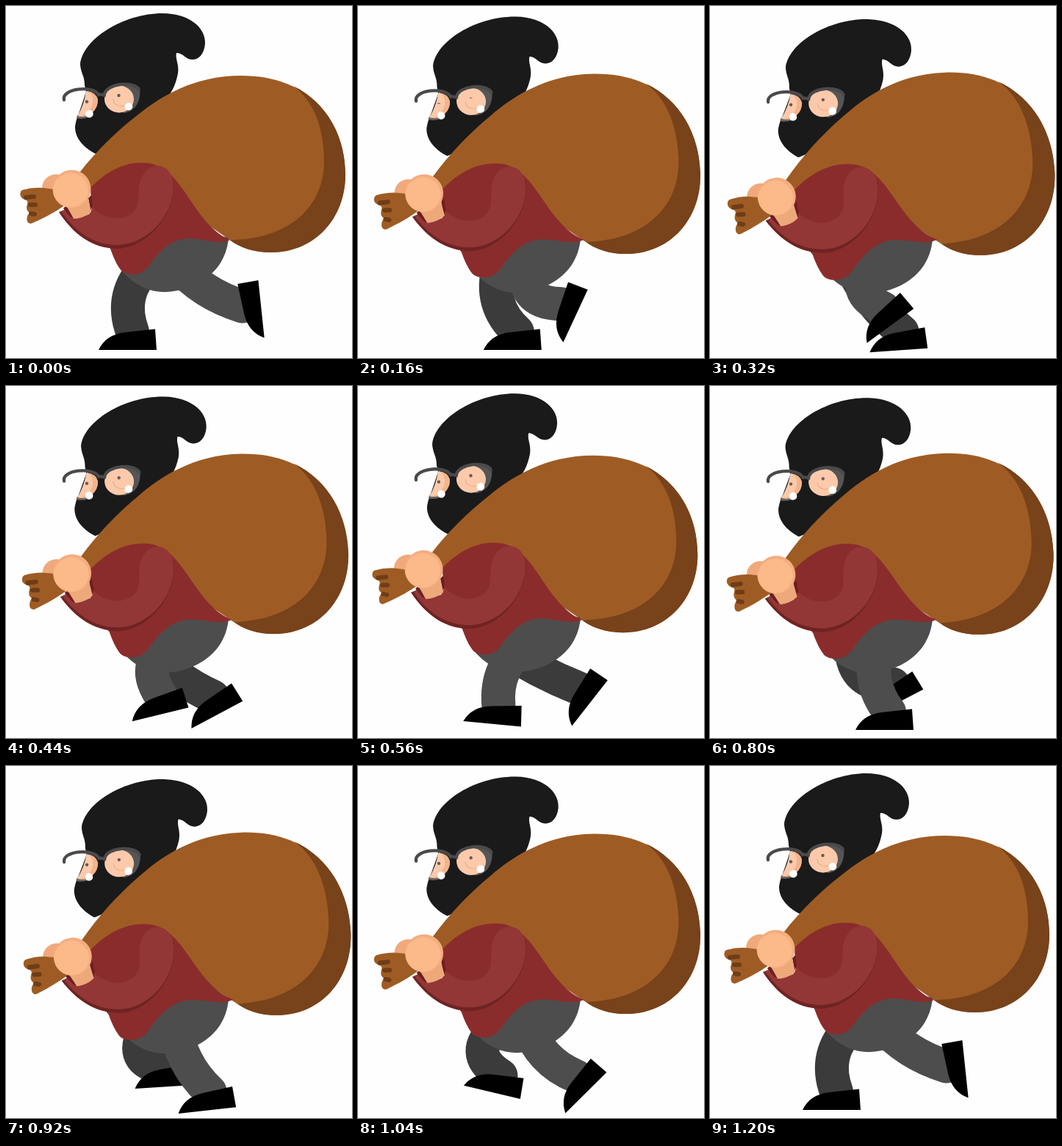
An HTML page that plays this animation: 471x480 px, repeating every 1220 ms.

```html
<!DOCTYPE html>
<html lang="en">
<head>
<meta charset="utf-8">
<title>Sneaking away</title>
<style>
html, body { margin: 0; height: 100%; overflow: hidden; background: #fefefe; }
svg { display: block; width: 100vw; height: 100vh; }
.pants { fill: none; stroke-width: 46; stroke-linecap: round; }
</style>
</head>
<body>
<svg viewBox="0 0 471 480">
  <g id="head">
    <path fill="#1a1a1a" d="M101 80C104 45 160 10 213 10C250 10 272 30 271 51C270 66 262 73 254 73C244 73 240 63 232 64C230 72 236 80 234 92C231 108 225 120 215 130L160 185L123 202C105 193 94 180 94 165C95 158 96 154 98 150L109 117L107 108C107 95 102 92 101 80Z"/>
    <path fill="#666" d="M97 149L96 153Q106 155 113 151L108 147Z"/>
    <path fill="#f2b48c" d="M109 117Q107 132 98 150Q108 153 117 146Q126 138 125 127Q122 117 110 116Z"/>
    <path fill="#fccaab" d="M109 117Q107 132 98 150Q106 151 112 144Q119 137 118 126Q116 117 110 116Z"/>
    <path fill="#555" d="M140 113C150 104 175 102 182 112C184 130 176 144 160 146Z"/>
    <ellipse cx="154" cy="127" rx="20" ry="18.5" fill="#fccaab"/>
    <path fill="none" stroke="#f2b48c" stroke-width="1.6" d="M146 127C146 134 153 138 161 136"/>
    <g fill="none" stroke="#4a4a4c" stroke-width="4.3" stroke-linecap="round">
      <path d="M79 128C75 113 118 107 126 121Q130 120 134 122"/>
      <path d="M134 120C138 105 174 102 181 114"/>
    </g>
    <g fill="#6b5a52">
      <ellipse class="pupil" cx="110" cy="130.5" rx="2.2" ry="2.2"/>
      <ellipse class="pupil" cx="153.5" cy="122" rx="2.2" ry="2.2"/>
    </g>
    <circle cx="113.5" cy="147" r="5.3" fill="#fff"/>
    <circle cx="167" cy="137" r="5.3" fill="#fff"/>
  </g>
  <g class="arm">
    <ellipse cx="68" cy="248" rx="19" ry="18.5" fill="#f0a97b"/>
  </g>
  <g id="bag">
    <path fill="#9e5c24" d="M22 251Q36 247 50 248L66 250L88 243L101 226C122 199 150 171 180 148C210 124 255 95 320 95C415 95 462 158 462 230C462 290 420 336 361 336C335 336 318 329 303 318L220 260L117 247L80 272C65 282 52 289 38 295Q32 299 29 294Q27 287 32 282Q26 278 29 270Q31 265 25 264Q17 260 20 253Z"/>
    <path fill="#78421a" d="M391 109C421 131 433 170 433 212C433 270 390 318 305 319C318 330 340 336 361 336C420 336 462 290 462 230C462 180 438 132 391 109Z"/>
    <path fill="none" stroke="#6f3d17" stroke-width="6" stroke-linecap="round" d="M27 261L38 260M33 271L40 271M34 283L39 284"/>
  </g>
  <path id="backLeg" class="pants" stroke="#3b3b3b"/>
  <path id="backShoe"/>
  <path id="hips" fill="#4d4d4d" d="M150 350C165 375 190 390 215 390C245 390 298 372 303 316L230 300Z"/>
  <path id="frontLeg" class="pants" stroke="#4d4d4d"/>
  <path id="frontShoe"/>
  <path id="torso" fill="#8b2c2c" d="M115 248C140 222 165 212 190 214C212 215 228 231 243 253C260 278 278 308 305 319C290 326 272 318 250 317C228 317 214 330 203 343C194 353 190 366 172 366Q163 366 157 361C150 352 146 342 142 331L118 300Z"/>
  <g class="arm">
    <path fill="#6f2323" d="M228 238C233 283 192 331 150 331C118 330 92 312 72 281L84 276L94 290L170 300L205 250Z"/>
    <path fill="#933636" d="M207 218C222 219 228 233 228 246C227 290 189 326 150 326C116 325 92 305 75 280L84 276L94 290L113 284L118 275C135 292 156 293 170 284C183 274 179 262 181 248C183 229 194 218 207 218Z"/>
    <path fill="#6b2020" d="M78 276L82 272L94 290L88 288ZM112 262L116 258L118 273L115 279Z"/>
    <path fill="#eda97a" d="M82 272L92 290Q105 290 116 281L111 258Z"/>
    <circle cx="89.5" cy="249.5" r="26" fill="#f3ad80"/>
    <ellipse cx="88" cy="251" rx="24" ry="23.5" fill="#fcb98a"/>
  </g>
</svg>
<script>
const LOOP = 1220, CYCLE = 1200, STEP = 20;
const ROLL = 300, LIFT = 330, PEAK = 600;   // moments of one stride, ms
const GROUND = 444, PACE = 0.28, REACH = 134;
const $ = id => document.getElementById(id);
const arms = document.querySelectorAll('.arm');
const pupils = document.querySelectorAll('.pupil');

// land: ankle x at touchdown; kick: heel rise; flex: toe raise, peaking by `late`
const legs = [
  { leg: $('backLeg'), shoe: $('backShoe'), hip: [192, 355], land: 172, shift: 0, kick: 60, flex: 25, late: 2 },
  { leg: $('frontLeg'), shoe: $('frontShoe'), hip: [230, 350], land: 188, shift: 600, kick: 96, flex: 10, late: 6 }
];

// Shoe outline around the ankle
legs.forEach(l => l.shoe.setAttribute('d', 'M-46 25L33 25L31-3.5L-10 1Q-36 4-46 25Z'));

function ankleX(p) {
  const off = PACE * LIFT;
  if (p < LIFT) return PACE * p;
  if (p < PEAK) return off + (REACH - off) * (p - LIFT) / (PEAK - LIFT);
  return REACH * ((CYCLE - p) / (CYCLE - PEAK)) ** 1.35;
}

function ankleY(p) {
  const q = Math.max(0, (p - LIFT) / (CYCLE - LIFT));
  return GROUND - 38 * Math.sin(Math.PI * q ** 0.9) ** 0.8;
}

function tilt(p, { kick, flex, late }) {
  if (p < PEAK) return -kick * Math.max(0, (p - ROLL) / (PEAK - ROLL));
  const v = (p - PEAK) / (CYCLE - PEAK);
  return flex * Math.sin(Math.PI * v ** late) - kick * (1 - v) ** 1.25;
}

function drawLeg(l, t) {
  const p = (t + CYCLE - l.shift) % CYCLE;
  const [hx, hy] = l.hip, x = l.land + ankleX(p), y = ankleY(p);
  // The knee bends forward more as the foot nears the hip
  const dx = x - hx, dy = y - hy, d = Math.hypot(dx, dy);
  const bend = Math.max(0, 98 - 0.75 * d) / d;
  const kx = (hx + x) / 2 - dy * bend, ky = (hy + y) / 2 + dx * bend;
  l.leg.setAttribute('d', `M${hx} ${hy}Q${kx} ${ky} ${x} ${y}`);
  l.shoe.setAttribute('transform', `translate(${x} ${y}) rotate(${tilt(p, l)})`);
}

// Slight affine warp around a centre
function warp(el, cx, cy, a, b, c, d, dx, dy) {
  el.setAttribute('transform',
    `translate(${cx + dx} ${cy + dy}) matrix(${1 + a} ${b} ${c} ${1 + d} 0 0) translate(${-cx} ${-cy})`);
}

function draw(t) {
  const k = (1 - Math.cos(t / CYCLE * 4 * Math.PI)) / 2;   // body dips twice per cycle
  $('head').setAttribute('transform', `rotate(${2.2 * k} 0 135)`);
  warp($('bag'), 340, 215, .009 * k, -.038 * k, .05 * k, .04 * k, 5.5 * k, -.3 * k);
  warp($('torso'), 200, 214, .04 * k, -.05 * k, 0, .035 * k, 0, k);
  $('hips').setAttribute('transform', `translate(0 ${2 * k})`);
  arms.forEach(a => a.setAttribute('transform', `rotate(${-4.4 * k} 229 238)`));
  const shut = Math.max(0, 1 - Math.abs(t - 160) / 60);
  pupils.forEach(e => e.setAttribute('ry', 2.2 - 1.6 * shut));
  legs.forEach(l => drawLeg(l, t));
}

const start = performance.now();
function tick() {
  const t = (performance.now() - start) % LOOP;
  draw(Math.floor(t / STEP) * STEP);
  requestAnimationFrame(tick);
}
draw(0);
requestAnimationFrame(tick);
</script>
</body>
</html>
```
